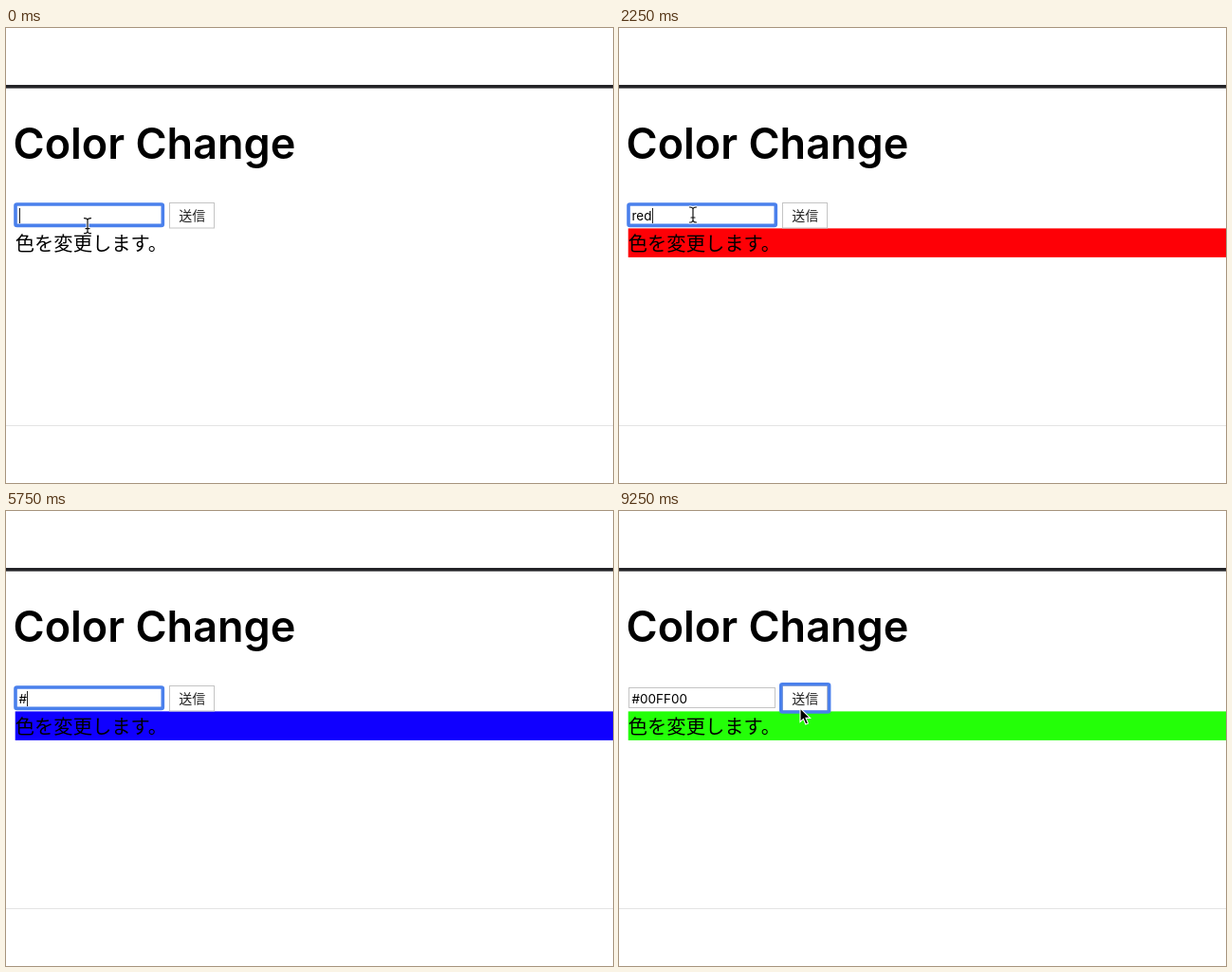
An HTML page that plays this animation: 640x480 px, repeating every 9.5 s.

```html
<!DOCTYPE html>
<html lang="ja">
<head>
<meta charset="utf-8">
<title>Color Change</title>
<style>
  html, body { margin: 0; width: 100%; height: 100%; overflow: hidden; background: #fff; }
  svg { display: block; width: 640px; height: 480px; }
  text { font-family: "Noto Sans CJK JP", "Noto Sans CJK", sans-serif; white-space: pre; }
  #title, #value { font-family: Inter, sans-serif; }
  #title { font-size: 45px; font-weight: 600; }
  #value { font-size: 13.5px; }
  .box { fill: #fff; stroke: #c4c4c4; }
  .ring { fill: none; stroke: #4a80ec; stroke-width: 3.6; filter: blur(0.6px); }
</style>
</head>
<body>
<svg viewBox="0 0 640 480">
  <rect y="60" width="640" height="3.6" fill="#232327"/>
  <rect y="419" width="640" height="1" fill="#e4e4e4"/>
  <text id="title" x="7.5" y="138">Color Change</text>

  <rect id="bar" x="9.7" y="211.4" width="631" height="30.5"/>
  <text x="9.8" y="234.7" font-size="20.3">色を変更します。</text>

  <rect class="box" x="10.5" y="186.5" width="154" height="21"/>
  <rect class="box" x="172.5" y="184.5" width="47" height="26.5"/>
  <rect id="inputRing" class="ring" x="10" y="186" width="155.3" height="22.4" rx="1.5"/>
  <rect id="buttonRing" class="ring" x="170.8" y="182.8" width="50.8" height="29.2" rx="1.5"/>
  <text x="182.3" y="202.8" font-size="14" fill="#222">送信</text>
  <text id="value" x="13.5" y="202.6"></text>
  <rect id="caret" y="190" width="1" height="16" fill="#222"/>

  <path id="arrow" d="M0 0V14.5L3.4 11.4L5.8 17L8.4 15.9L6 10.4H10.6Z" stroke="#fff" stroke-width="1.1"/>
  <g id="beam" fill="none" stroke-linecap="round">
    <path d="M-3.5 -8Q0 -8 0 -5.5Q0 -8 3.5 -8M0 -6V6M-3.5 8Q0 8 0 5.5Q0 8 3.5 8M-2 3H2" stroke="#fff" stroke-width="3"/>
    <path d="M-3.5 -8Q0 -8 0 -5.5Q0 -8 3.5 -8M0 -6V6M-3.5 8Q0 8 0 5.5Q0 8 3.5 8M-2 3H2" stroke="#111" stroke-width="1.2"/>
  </g>
</svg>
<script>
const LOOP = 9500;
const el = id => document.getElementById(id);
const show = (id, on) => el(id).setAttribute('visibility', on ? 'visible' : 'hidden');

const arrow = (x, y) => ({ pointer: 'arrow', x, y });
const beam = (x, y) => ({ pointer: 'beam', x, y });
const type = text => ({ text, caret: true, pointer: '' });
const submit = color => ({ color, focus: 'button', caret: false });
const edit = { focus: 'input', caret: true };

// Each entry changes part of the state from its time (ms) onward.
const timeline = [
  [0, { text: '', color: 'none', ...edit, ...beam(86, 208.7) }],
  [500, type('r')],
  [750, type('red')],
  [1000, beam(112, 205)],
  [1250, { caret: false, ...arrow(214, 209) }],
  [1500, { ...submit('#fe0006'), ...arrow(182, 197) }],
  [2000, beam(130, 197)],
  [2250, { ...edit, ...beam(78, 197) }],
  [2500, type('')],
  [2750, type('b')],
  [3000, type('blue')],
  [3250, beam(148, 199)],
  [3500, { caret: false, ...arrow(194, 196) }],
  [3750, submit('#1000ff')],
  [4000, beam(140, 195)],
  [4250, { ...edit, ...beam(93, 194.5) }],
  [4750, beam(93, 210)],
  [5000, { text: 'bl', ...beam(93, 226) }],
  [5250, type('')],
  [5750, type('#')],
  [6250, type('#0')],
  [6500, type('#00')],
  [6750, type('#00F')],
  [7000, type('#00FF')],
  [7250, type('#00FF00')],
  [7500, arrow(152, 213)],
  [7750, { caret: false, ...arrow(191, 208) }],
  [8000, submit('#24ff08')]
];

function draw(now) {
  const time = now % LOOP;
  const state = {};
  for (const [start, change] of timeline) {
    if (start <= time) Object.assign(state, change);
  }
  const value = el('value');
  value.textContent = state.text;
  el('bar').setAttribute('fill', state.color);
  el('caret').setAttribute('x', Math.round(13.7 + value.getComputedTextLength()));
  show('caret', state.caret);
  show('inputRing', state.focus === 'input');
  show('buttonRing', state.focus === 'button');
  for (const id of ['arrow', 'beam']) {
    show(id, state.pointer === id);
    el(id).setAttribute('transform', `translate(${state.x} ${state.y})`);
  }
}

const begin = performance.now();
function tick() {
  draw(performance.now() - begin);
  requestAnimationFrame(tick);
}
tick();
</script>
</body>
</html>
```
